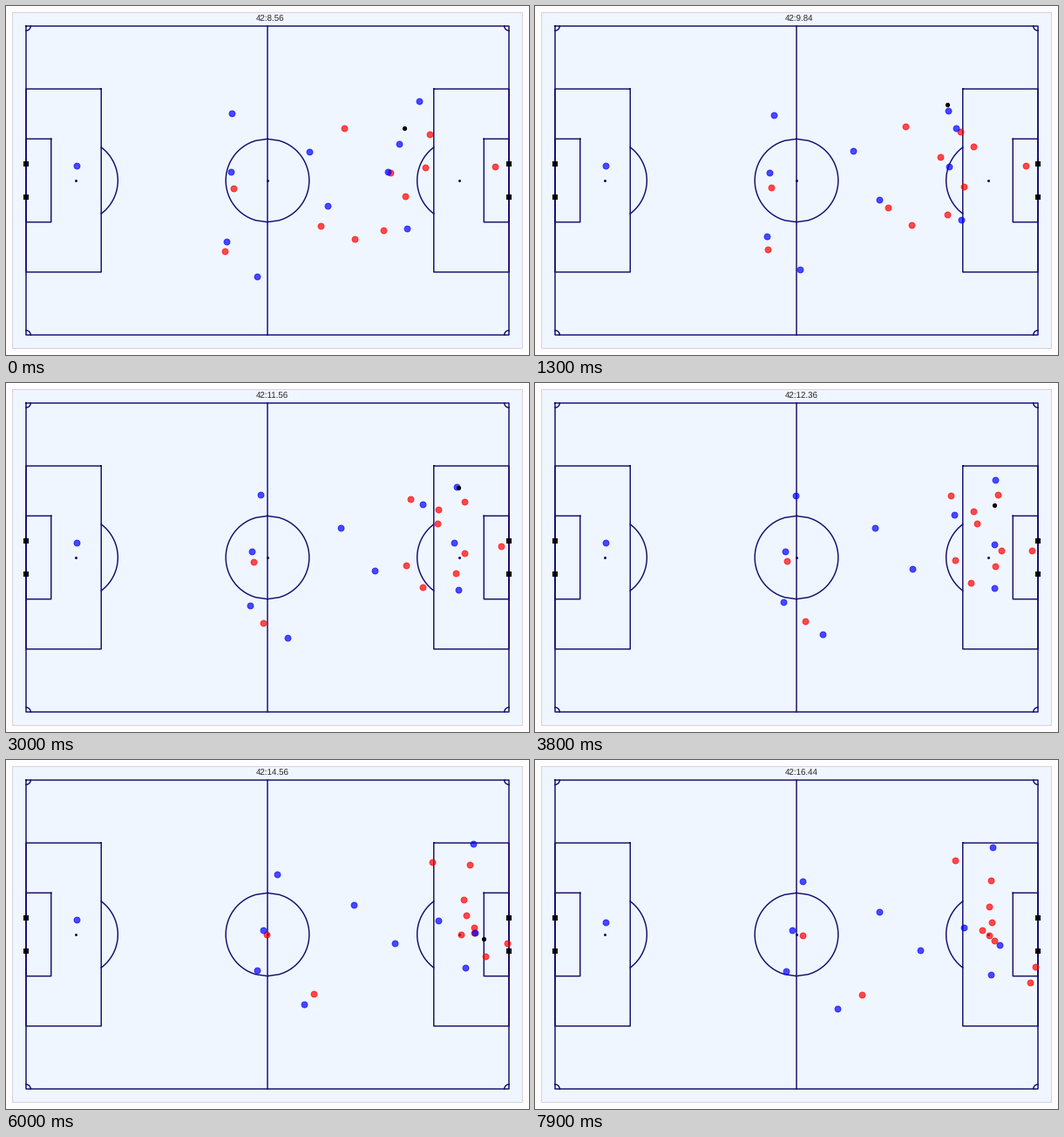
These frames come from a looping animation (600 px wide and 400 px high, 8000 ms). A matplotlib script:

```python
import numpy as np
import matplotlib.pyplot as plt
from matplotlib.animation import FuncAnimation
from matplotlib.patches import Rectangle

plt.rcParams["text.hinting"] = "none"

W, H, DPI = 600, 400, 100
FRAMES, STEP = 80, 100
PT = 72 / DPI
INK, GRASS = "#140c6c", "#f0f6ff"

# Pitch in metres, measured from the centre spot.
HALF_L, HALF_W = 53, 34
SX, SY = 277 / HALF_L, 177 / HALF_W
RADIUS, SPOT, AREA = 9.15, HALF_L - 11, HALF_L - 16.5

ATTACK, LOOP = 6000, 7900
RETREAT = (-4, 8)


def runner(start, goal, bend=(0, 0), drift=RETREAT):
    """Slowing run from start to goal, bowed sideways, then a drift away."""
    start, goal, bend, drift = map(np.array, (start, goal, bend, drift))

    def at(t):
        u = min(t / ATTACK, 1)
        v = max(t - ATTACK, 0) / (LOOP - ATTACK)
        return (start + (goal - start) * np.sin(np.pi / 2 * u)
                + bend * np.sin(np.pi * u) + drift * v * v)
    return at


blue = [
    runner((80.7, 182.7), (80.7, 183.3), drift=(0.5, 3)),
    runner((258.5, 122.5), (311, 131), bend=(-4, -1)),
    runner((257.5, 190), (295, 195), bend=(-2, -1), drift=(0, 0)),
    runner((253, 269.5), (287.5, 241), bend=(3, 6), drift=(0, 1)),
    runner((287.5, 310), (341.5, 279.5), bend=(-3, 4), drift=(5, 5)),
    runner((347.5, 167), (398.5, 165.5)),
    runner((369, 229), (445.5, 209.5)),
    runner((437.5, 190), (537.5, 198), bend=(6, -13), drift=(-5, 14)),
    runner((450.5, 158), (536, 96), bend=(6, 5), drift=(-11, 4)),
    runner((474, 109), (496, 184), bend=(-12, -23)),
    runner((459.5, 254.5), (526.5, 238), bend=(12, -6)),
]
red = [
    runner((560.5, 183.5), (575, 210), bend=(-3, -15), drift=(-1, 27)),
    runner((485.5, 147), (524.5, 159.5), bend=(-17, -11)),
    runner((480.5, 185), (531.5, 120), bend=(9, -3), drift=(-9, 18)),
    runner((441, 191), (528, 178), bend=(-8, -21)),
    runner((458, 218), (537, 191.5), bend=(12, -4), drift=(-16, 9)),
    runner((433, 256.5), (537, 198), bend=(9, 3), drift=(-10, 9)),
    runner((388, 140), (488.5, 117), bend=(5, 9), drift=(-7, -2)),
    runner((399.5, 267), (549.5, 225), bend=(-28, -3), drift=(18, 30)),
    runner((361, 252), (521.5, 200), bend=(-15, -6), drift=(-9, -5)),
    runner((260.5, 209), (299, 199.5), bend=(-4, 3), drift=(8, 1)),
    runner((250.5, 280.5), (352.5, 267.5), bend=(-28, 4), drift=(22, 1)),
]

# Pass to the wing, hold, pass forward, cross, shot.
BALL_T = [0, 1300, 1900, 3000, 4700, 6000, 6300]
BALL_X = [457, 473, 473, 518.7, 536, 547.5, 578]
BALL_Y = [140, 113.2, 121, 120.2, 163, 205, 214]


def ball_at(t):
    if t > BALL_T[-1]:
        return np.nan, np.nan
    return np.interp(t, BALL_T, BALL_X), np.interp(t, BALL_T, BALL_Y)


fig = plt.figure(figsize=(W / DPI, H / DPI), dpi=DPI, facecolor="#fffcfd")
ax = fig.add_axes([0, 0, 1, 1])
ax.set(xlim=(0, W), ylim=(H, 0))
ax.axis("off")


def to_px(x, y):
    return W / 2 + SX * np.asarray(x), H / 2 + SY * np.asarray(y)


def line(x, y):
    ax.plot(*to_px(x, y), color=INK, lw=1.45 * PT, snap=False, zorder=2)


def box(x0, x1, half):
    line([x0, x1, x1, x0, x0], [-half, -half, half, half, -half])


def marks(x, y, size, color, marker="o"):
    ax.scatter(*to_px(x, y), s=(size * PT)**2, c=color, marker=marker, lw=0, zorder=3)


def bow(cx, side, half, r=RADIUS):
    # Even steps in y leave a full circle slightly flat at top and bottom.
    y = np.linspace(-half, half, 50)
    line(cx + side * np.sqrt(np.maximum(r * r - y * y, 0)), y)


def draw_pitch():
    ax.add_patch(Rectangle((7.6, 7.6), W - 15.2, H - 15.2, fc=GRASS,
                           ec="#d3d0da", lw=PT, snap=False))
    box(-HALF_L, HALF_L, HALF_W)
    line([0, 0], [-HALF_W, HALF_W])
    arc_half = np.sqrt(RADIUS**2 - (SPOT - AREA)**2)
    quarter = np.linspace(0, np.pi / 2, 12)
    for side in (-1, 1):
        goal_line = side * HALF_L
        box(side * AREA, goal_line, 20.16)
        box(side * (HALF_L - 5.5), goal_line, 9.16)
        bow(0, side, RADIUS)
        bow(side * SPOT, -side, arc_half)
        for end in (-1, 1):
            line(goal_line - side * np.cos(quarter), end * (HALF_W - np.sin(quarter)))
        marks([goal_line] * 2, [-3.66, 3.66], 5.2, "black", "s")
    marks([-SPOT, 0, SPOT], [0, 0, 0], 3, INK)


def dots(color, size, z, alpha=1):
    return ax.scatter([], [], s=(size * PT)**2, c=color, alpha=alpha,
                      lw=0.9 * PT, zorder=z)


draw_pitch()
red_dots = dots("red", 7, 4, 0.7)
blue_dots = dots("blue", 7, 5, 0.7)
ball = dots("black", 4.3, 6)
clock = ax.text(286.5, 18.4, "", family="Liberation Sans", size=9.75 * PT,
                color="#262626", va="baseline")


def update(i):
    t = i * STEP
    red_dots.set_offsets([p(t) for p in red])
    blue_dots.set_offsets([p(t) for p in blue])
    ball.set_offsets([ball_at(t)])
    # The match clock ticks 25 times a second.
    clock.set_text(f"42:{8.56 + 0.04 * (t // 40):.2f}")
    return red_dots, blue_dots, ball, clock


anim = FuncAnimation(fig, update, frames=FRAMES, interval=STEP, repeat=True)
plt.show()
```
